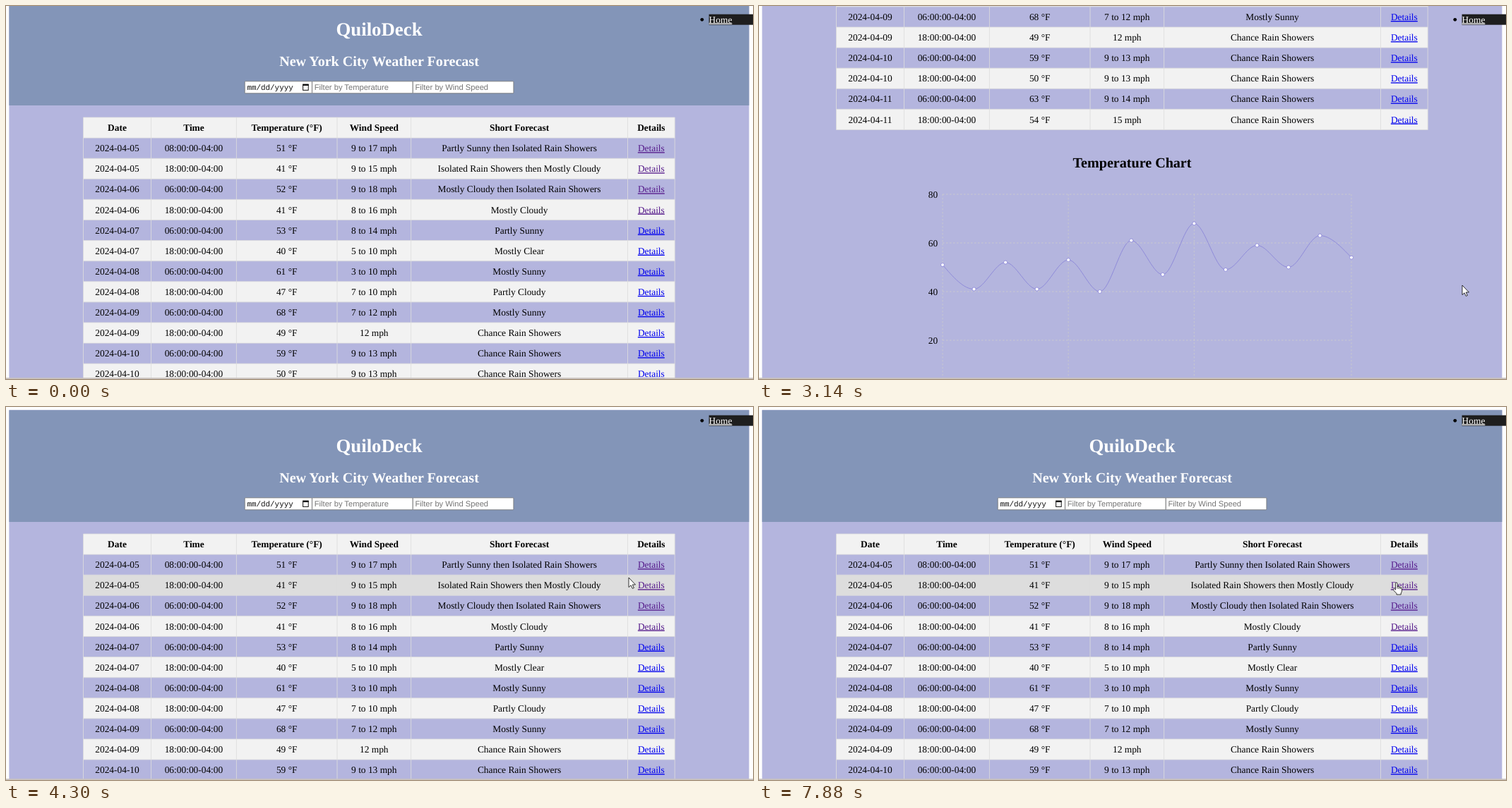
Animation, 1058 px wide and 529 px high, one loop 8 s. Source, as an HTML page:

```html
<!DOCTYPE html>
<html lang="en">
<head>
<meta charset="utf-8">
<title>Weather Forecast</title>
<style>
html, body { margin: 0; width: 100%; height: 100%; overflow: hidden; background: #fefefe; }
svg { display: block; width: 100vw; height: 100vh; }
text { font: 13.4px "Liberation Serif", "Times New Roman", serif; text-rendering: geometricPrecision; }
.b { font-weight: bold; }
.h1 { font-size: 26.8px; }
.h2 { font-size: 20.1px; }
.mid { text-anchor: middle; }
.link { text-decoration: underline; fill: #00e; }
.seen { fill: #551a8b; }
.light { fill: #fff; }
.field { font: 11.17px "Liberation Sans", Arial, sans-serif; fill: #757575; }
.mono { font: 10.9px "Liberation Mono", monospace; fill: #111; }
</style>
</head>
<body>
<svg id="stage" viewBox="0 0 1058 529" preserveAspectRatio="none"></svg>
<script>
const NS = "http://www.w3.org/2000/svg";
const LOOP = 8000, ROW = 29.1, TOP = 180;
const LILAC = "#b4b5de", PALE = "#f2f2f2";
const stage = document.getElementById("stage");

function el(parent, tag, attrs = {}, content) {
  const node = document.createElementNS(NS, tag);
  for (const k in attrs) node.setAttribute(k, attrs[k]);
  if (content !== undefined) node.textContent = content;
  return parent.appendChild(node);
}
const rect = (p, x, y, width, height, fill, more) =>
  el(p, "rect", { x, y, width, height, fill, ...more });
const text = (p, x, y, s, cls = "", more) => el(p, "text", { x, y, class: cls, ...more }, s);
const line = (p, x1, y1, x2, y2, stroke, more) =>
  el(p, "line", { x1, y1, x2, y2, stroke, "stroke-width": 0.84, ...more });

// Dashboard
const dash = el(stage, "g");
rect(dash, 4.4, 4.4, 1048, 1050, LILAC);
rect(dash, 4.4, 4.4, 1048, 158.6, "#8395b8");
text(dash, 528.5, 64, "QuiloDeck", "b h1 mid light");
text(dash, 528.5, 106.6, "New York City Weather Forecast", "b h2 mid light");

function field(x, w, label, cls) {
  rect(dash, x, 128.8, w, 17, "#fff", { stroke: "#767676", "stroke-width": 0.84, rx: 1 });
  text(dash, x + 3.2, 141.2, label, cls);
}
field(338.2, 95.2, "mm/dd/yyyy", "mono");
field(433.6, 142.6, "Filter by Temperature", "field");
field(576.3, 142.6, "Filter by Wind Speed", "field");
rect(dash, 420.6, 133.4, 7.6, 8, "none", { stroke: "#111" });
rect(dash, 420.2, 132.6, 8.4, 2.4, "#111");

// Table
const edges = [109.5, 205.5, 326.4, 469, 573.6, 880.5, 947.2];
const left = edges[0], right = edges[6];
const heads = ["Date", "Time", "Temperature (°F)", "Wind Speed", "Short Forecast", "Details"];
const rain = "Chance Rain Showers";
const forecast = [
  "51|9 to 17|Partly Sunny then Isolated Rain Showers",
  "41|9 to 15|Isolated Rain Showers then Mostly Cloudy",
  "52|9 to 18|Mostly Cloudy then Isolated Rain Showers",
  "41|8 to 16|Mostly Cloudy",
  "53|8 to 14|Partly Sunny",
  "40|5 to 10|Mostly Clear",
  "61|3 to 10|Mostly Sunny",
  "47|7 to 10|Partly Cloudy",
  "68|7 to 12|Mostly Sunny",
  `49|12|${rain}`,
  `59|9 to 13|${rain}`,
  `50|9 to 13|${rain}`,
  `63|9 to 14|${rain}`,
  `54|15|${rain}`
].map(s => s.split("|"));
const rowFill = i => i % 2 ? PALE : LILAC;

function addRow(i, cells, fill, cls) {
  const y = TOP + ROW * (i + 1);
  const bg = rect(dash, left, y, right - left, ROW, fill);
  cells.forEach((s, c) =>
    text(dash, (edges[c] + edges[c + 1]) / 2, y + 19.1, s, `mid ${cls(c)}`));
  return bg;
}
addRow(-1, heads, PALE, () => "b");
const rows = forecast.map(([temp, wind, sky], i) => {
  const day = String(5 + (i >> 1)).padStart(2, "0");
  const hour = i === 0 ? "08" : i % 2 ? "18" : "06";
  const cells = [`2024-04-${day}`, `${hour}:00:00-04:00`, `${temp} °F`, `${wind} mph`, sky, "Details"];
  return addRow(i, cells, rowFill(i), c => c < 5 ? "" : i < 4 ? "link seen" : "link");
});
const bottom = TOP + ROW * (rows.length + 1);
for (let y = TOP; y < bottom + 1; y += ROW) line(dash, left, y, right, y, "#ddd");
edges.forEach(x => line(dash, x, TOP, x, bottom, "#ddd"));

// Chart
text(dash, 528.5, 669.6, "Temperature Chart", "b h2 mid");
const temps = forecast.map(f => +f[0]);
const px = i => 260 + i * 44.54;
const py = v => 708 + (80 - v) * 3.45;
const dashed = { "stroke-dasharray": "2.5 2.5" };
for (let v = 80; v >= 0; v -= 20) {
  line(dash, px(0), py(v), px(13), py(v), "#ccc", dashed);
  text(dash, 253.2, py(v) + 4.6, v, "", { "text-anchor": "end" });
}
[0, 4, 8, 13].forEach(i => line(dash, px(i), py(80), px(i), py(0), "#ccc", dashed));

// Monotone curve: flat at turning points, harmonic slopes elsewhere
const slope = temps.map((v, i) => {
  const a = v - temps[i - 1], b = temps[i + 1] - v;
  if (isNaN(a)) return b * 1.5;
  if (isNaN(b)) return a * 1.5;
  return a * b > 0 ? 2 * a * b / (a + b) : 0;
});
const curve = temps.map((v, i) => i === 0 ? `M${px(0)} ${py(v)}` :
  `C${px(i - 2 / 3)} ${py(temps[i - 1] + slope[i - 1] / 3)} ` +
  `${px(i - 1 / 3)} ${py(v - slope[i] / 3)} ${px(i)} ${py(v)}`).join("");
const ink = { stroke: "#8884d8", "stroke-width": 0.84 };
el(dash, "path", { d: curve, fill: "none", ...ink });
temps.forEach((v, i) => el(dash, "circle", { cx: px(i), cy: py(v), r: 2.5, fill: "#fff", ...ink }));

// Details page
const card = el(stage, "g");
rect(card, 182.8, 4.4, 705.4, 307.2, "#b1bbda",
  { rx: 4, style: "filter:drop-shadow(0 0 3px rgba(0,0,0,.12))" });
text(card, 199.5, 57, "Forecast Details for Today", "b h2");
["Date: 2024-04-05", "Time: 08:00:00-04:00", "Temperature: 51 °F", "Wind Speed: 9 to 17 mph",
  "Short Forecast: Partly Sunny then Isolated Rain Showers",
  "Detailed Forecast: Isolated rain showers after 1pm. Partly sunny, with a high near 51. West wind 9 to 17 mph. Chance of"
].forEach((s, i) => text(card, 199.5, 93 + i * 33.55, s));
text(card, 199.5, 281, "precipitation is 20%.");

// Fixed menu
const nav = el(stage, "g");
el(nav, "circle", { cx: 985.8, cy: 19.3, r: 2.4 });
rect(nav, 995.6, 11.7, 80, 15, "#1e1e1e");
text(nav, 995.6, 23.6, "Home", "link light");

rect(stage, 0, 527.2, 1058, 1.8, "#c9c2bf");

// Pointers
const outline = { fill: "#fff", stroke: "#000", "stroke-width": 0.8, "stroke-linejoin": "round" };
const arrow = el(stage, "path", { d: "M0 0V13.6L3.1 10.8 5.3 15.4 7.4 14.5 5.3 10H9.5Z", ...outline });
const hand = el(stage, "path", {
  d: "M-1.4 9.6V1.3A1.2 1.2 0 0 1 1.1 1.3V5.6L2 5.4Q3.2 5.4 3.4 6.3Q5.2 5.8 5.6 7Q7.4 6.8 7.5 8.4V11.6" +
    "Q7.4 13.6 6.2 15V17H0V15.4L-4.6 10.6Q-5.2 9.2-3.8 8.8Q-2.6 8.8-1.4 10.2ZM1.1 5.6V8.6M3.4 6.3V9M5.6 7V9.2",
  ...outline
});

// Each glide runs from the value before it to its own, between two times
const scrolls = [
  { from: 1117, to: 1600, end: [273] },
  { from: 1986, to: 2280, end: [441] },
  { from: 3169, to: 3830, end: [0] }
];
const moves = [
  { from: 480, to: 840, end: [996, 396] },
  { from: 4000, to: 4300, end: [882, 242] },
  { from: 4300, to: 4790, end: [906, 221] },
  { from: 5330, to: 6100, end: [1022, 19] },
  { from: 6100, to: 6230, end: [1035, 20] },
  { from: 7000, to: 7880, end: [903, 249] }
];
const wheel = f => 1 - (1 - f) ** 1.8;
const smooth = f => f * f * (3 - 2 * f);

function follow(glides, first, ease, t) {
  return glides.reduce((at, { from, to, end }) => {
    const f = ease(Math.min(1, Math.max(0, (t - from) / (to - from))));
    return at.map((v, n) => v + (end[n] - v) * f);
  }, first);
}
const show = (node, on) => node.setAttribute("visibility", on ? "visible" : "hidden");
const move = (node, x, y) => node.setAttribute("transform", `translate(${x} ${y})`);

function draw(t) {
  const scroll = Math.round(follow(scrolls, [22], wheel, t)[0]);
  const [x, y] = follow(moves, [994, 532], smooth, t);
  const onCard = t >= 4840 && t < 6710;
  show(dash, !onCard);
  show(card, onCard);
  move(dash, 0, -scroll);
  move(nav, onCard ? 14 : 0, 0);

  const inTable = !onCard && x > left && x < right;
  const pos = (y + scroll - TOP) / ROW - 1;
  const over = inTable ? Math.floor(pos) : -1;
  rows.forEach((r, i) => r.setAttribute("fill", i === over ? "#ddd" : rowFill(i)));

  const onLink = over >= 0 && x > 894 && x < 933 && Math.abs(pos - over - 0.5) < 0.28;
  const onHome = y > 11 && y < 27 && x > (onCard ? 1009 : 995);
  const pointing = onLink || onHome;
  show(arrow, !pointing && y < 529);
  show(hand, pointing);
  move(arrow, x, y);
  move(hand, x, y);
}

const start = performance.now();
function tick() {
  draw((performance.now() - start) % LOOP);
  requestAnimationFrame(tick);
}
tick();
</script>
</body>
</html>
```
